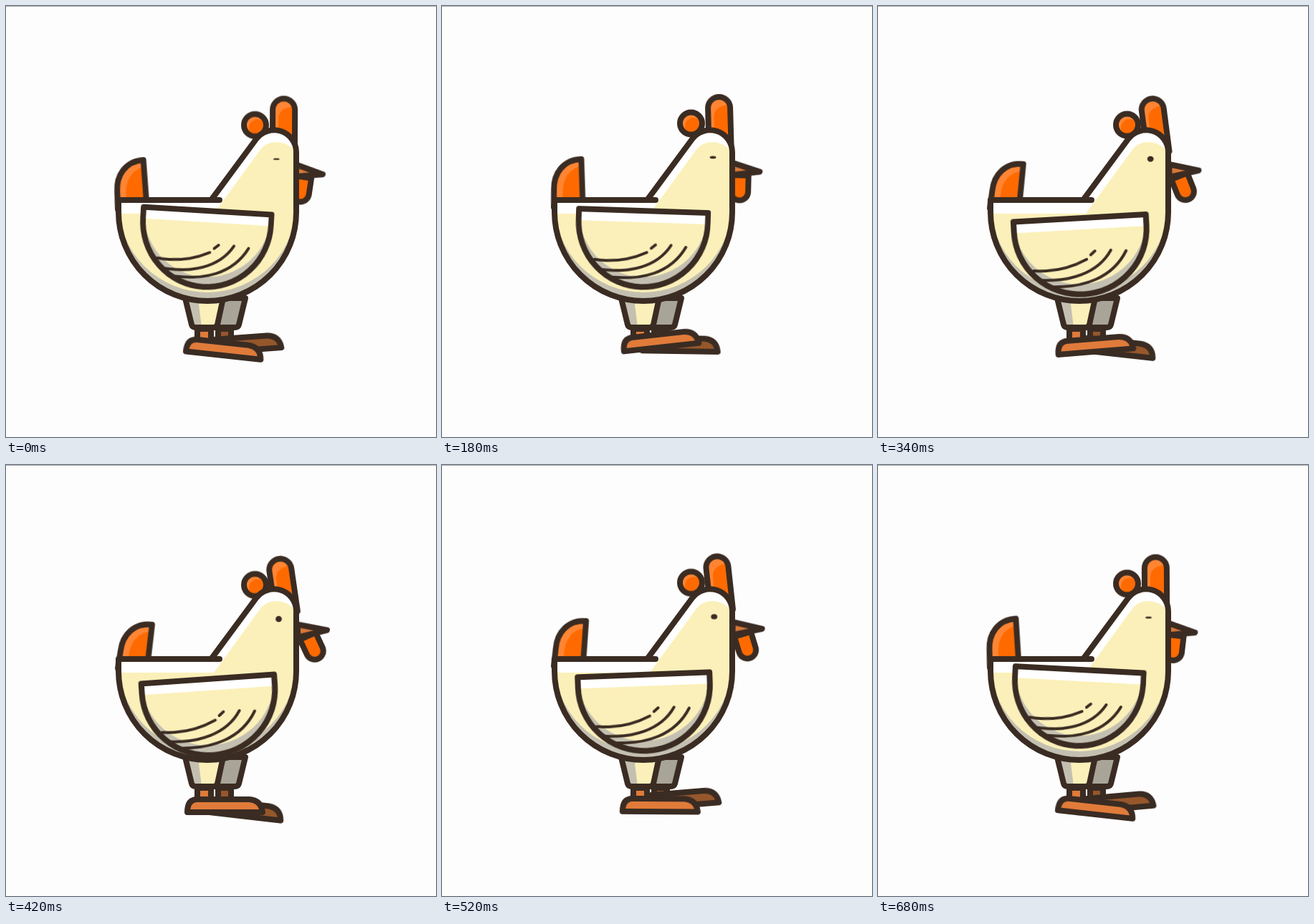
Recreate the animation shown at these times as an HTML page. Size 600 by 602 pixels, loop 0.7 s.

```html
<!DOCTYPE html>
<html lang="en">
<head>
<meta charset="utf-8">
<title>Walking hen</title>
<style>
  html, body { margin: 0; width: 100%; height: 100%; overflow: hidden; background: #fefdfe; }
  svg { display: block; width: 600px; height: 602px; }

  .line { stroke: #3a2c23; stroke-width: 8; stroke-linecap: round; stroke-linejoin: round; }
  .thin { stroke-width: 4; }
  .none { fill: none; }
  .ink { fill: #3a2c23; }
  .white { fill: #fff; }
  .cream { fill: #fbf0b9; }
  .shade { fill: #c4c0b1; }
  .dim { fill: #a8a598; }
  .red { fill: #ff6a00; }
  .glow { fill: #ff8533; }
  .beak { fill: #d87838; }
  .foot { fill: #e07b3a; }
  .far { fill: #96572b; }

  /* One sway is half a loop, one bob a quarter. */
  .sway { animation: 350ms cubic-bezier(.364, 0, .636, 1) -640ms infinite alternate; }
  .bob { animation: bob 175ms cubic-bezier(.364, 0, .636, 1) -290ms infinite alternate; }
  .turn { animation-name: turn; }
  .wing { animation-name: wing; }
  .eye { animation-name: eye; }
  .step { animation: step 700ms linear infinite; }
  .late { animation-delay: -350ms; }

  @keyframes bob { from { transform: translateY(4.6px); } to { transform: none; } }
  @keyframes turn {
    from { transform: translateX(calc(-1 * var(--x, 0px))) rotate(var(--a)); }
    to { transform: translateX(var(--x, 0px)) rotate(var(--b)); }
  }
  @keyframes wing {
    from { transform: translateX(-2px) rotate(4deg) scaleX(.975); }
    to { transform: translateX(1.5px) rotate(-4deg) scaleX(1.015); }
  }
  @keyframes eye {
    from { transform: translateX(-1.7px) scaleY(.25); }
    to { transform: translateX(1.7px) scaleY(1); }
  }
  @keyframes step {
    0%, 100% { transform: translate(0, 0) rotate(6.2deg); }
    5% { transform: translate(0, 3px) rotate(7deg); }
    10% { transform: translate(0, 4.5px) rotate(6.6deg); }
    17% { transform: translate(-1px, .5px) rotate(3deg); }
    24.3% { transform: translate(-1px, -5px) rotate(-4.5deg); }
    32% { transform: translate(-3px, -6px) rotate(-13.5deg); }
    35% { transform: translate(-3.5px, -6px) rotate(-14.5deg); }
    38% { transform: translate(-3.5px, -5.5px) rotate(-13.5deg); }
    47.1% { transform: translate(-3px, 0) rotate(-5.2deg); }
    50% { transform: translate(-3px, 0) rotate(-4.2deg); }
    60% { transform: translate(0, 0) rotate(0deg); }
    74.3% { transform: translate(-1px, -1px) rotate(.3deg); }
    82.9% { transform: translate(-1px, -2.3px) rotate(3.2deg); }
    97.1% { transform: translate(0, 0) rotate(6.4deg); }
  }
</style>
</head>
<body>
<svg viewBox="0 0 600 602">
  <defs>
    <path id="body" d="M298 271H157V288A124 124 0 0 0 405 288V204A31 31 0 0 0 349 186L287 270"/>
    <path id="wing" d="M0 0H-183V15A91.5 91.5 0 0 0 0 15Z"/>
    <path id="foot" d="M-24 20Q-24 2 -10 2H62Q79 3 81 20Z"/>
    <clipPath id="inBody"><use href="#body"/></clipPath>
    <clipPath id="inWing"><use href="#wing"/></clipPath>
  </defs>

  <rect width="600" height="1" fill="#a9a9a9"/>

  <!-- legs -->
  <path class="line dim" d="M334 408L325 445Q324 449 319 449H290L303 408Z"/>
  <path class="shade" d="M250 408L259 445Q260 449 265 449H289Q294 449 295 445L303 408Z"/>
  <path class="cream" d="M268 408L273 449H289Q294 449 295 445L303 408Z"/>
  <path class="line none" d="M250 408L259 445Q260 449 265 449H289Q294 449 295 445L303 408"/>
  <path class="line far" d="M296 451V468H314V451Z"/>
  <g transform="translate(305 463)"><use href="#foot" class="line far step late"/></g>
  <path class="line foot" d="M267 451V468H286V451Z"/>
  <g transform="translate(277 465)"><use href="#foot" class="line foot step"/></g>

  <!-- tail -->
  <g class="bob"><g transform="translate(162 280)">
    <g class="sway turn" style="--a:-5deg;--b:6.6deg">
      <path class="glow" d="M34.6 -66C10 -66 -5 -48 -5 -24L-6 0H34.6Z"/>
      <path class="red" d="M34.6 -57C18 -52 7 -42 7 -16V0H34.6Z"/>
      <path class="line none" d="M34.6 -66C10 -66 -5 -48 -5 -24L-6 0H34.6Z"/>
    </g>
  </g></g>

  <!-- comb, wattle and beak -->
  <g class="bob">
    <circle class="glow" cx="347.5" cy="163" r="15.5"/>
    <circle class="red" cx="351" cy="167" r="12"/>
    <circle class="line none" cx="347.5" cy="163" r="15.5"/>
    <g transform="translate(388 174)">
      <g class="sway turn" style="--a:.9deg;--b:-8.3deg">
        <path class="glow" d="M-16 14V-32.5A15.5 15.5 0 0 1 15 -32.5V28Z"/>
        <path class="red" d="M-8 14V-21Q-7 -36 15 -37V28Z"/>
        <path class="line none" d="M-16 14V-32.5A15.5 15.5 0 0 1 15 -32.5V28"/>
      </g>
    </g>
    <g transform="translate(416 223.5)">
      <path class="line red sway turn" style="--a:11deg;--b:-25deg" d="M-12 12V35A12 12 0 0 0 12 35V12Z"/>
    </g>
    <g transform="translate(410 226)">
      <path class="line beak sway turn" style="--a:8.5deg;--b:-1.5deg;--x:3px" d="M-6 -8L35 1L-6 10Z"/>
    </g>
  </g>

  <!-- body -->
  <g clip-path="url(#inBody)">
    <path class="shade" d="M150 150H410V420H150Z"/>
    <path class="cream" d="M157 150H405V276A124 124 0 0 1 157 276Z"/>
    <path class="white" d="M150 290H290L354 202Q362 190 378 190Q396 191 405 206V160H150Z"/>
  </g>
  <use href="#body" class="line none"/>

  <g class="bob"><g transform="translate(378.8 210.5)">
    <ellipse class="ink sway eye" rx="4.4" ry="4.3"/>
  </g></g>

  <!-- wing -->
  <g class="bob"><g transform="translate(372.5 288)">
    <g class="sway wing">
      <g clip-path="url(#inWing)">
        <path class="shade" d="M0 0H-183V110H0Z"/>
        <path class="cream" d="M0 0H-183V1A91.5 91.5 0 0 0 0 1Z"/>
        <path class="white" d="M0 0H-183V16H0Z"/>
      </g>
      <g class="none">
        <path class="line thin" d="M-159 70C-135 73 -110 70 -85 58M-79 52L-73 47"/>
        <path class="line thin" d="M-155 83C-110 89 -70 78 -51 47"/>
        <path class="line thin" d="M-143 93C-90 99 -50 85 -30 49"/>
      </g>
      <use href="#wing" class="line none"/>
    </g>
  </g></g>
</svg>
</body>
</html>
```
